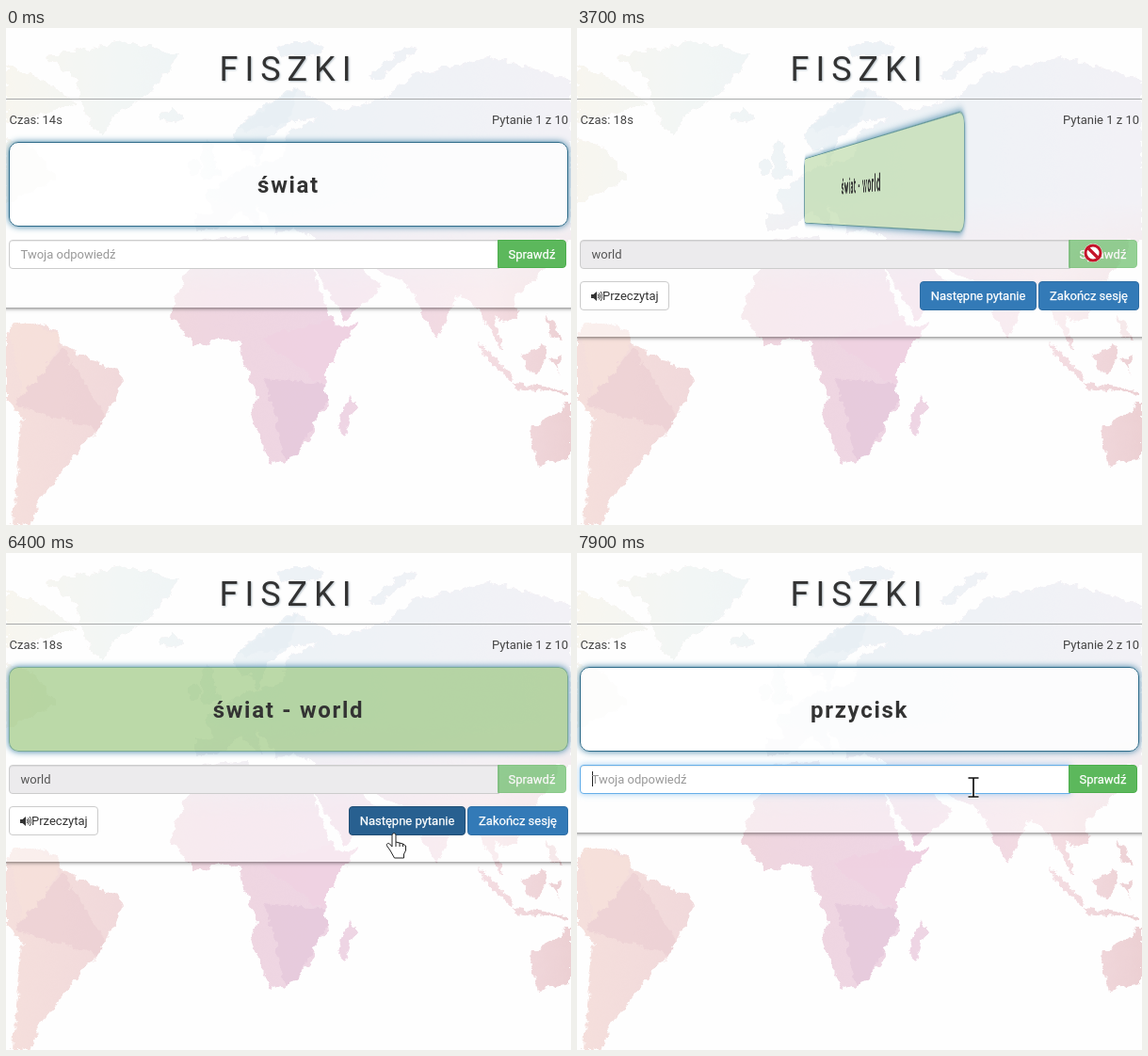
An HTML page for the animation above (8000 ms loop, 600 by 528 pixels).

```html
<!DOCTYPE html>
<html lang="pl">
<head>
<meta charset="utf-8">
<title>Fiszki</title>
<style>
html, body { margin: 0; width: 100%; height: 100%; overflow: hidden; background: #fefefe; }
* { box-sizing: border-box; }
#stage { position: absolute; left: 0; top: 0; width: 600px; height: 528px; overflow: hidden; font: 13px/16px Roboto, sans-serif; color: #444; }
#stage > *, #scene > * { position: absolute; }
#map, #pointer { left: 0; top: 0; width: 600px; height: 528px; }
#panel { left: -5px; top: -5px; width: 610px; background: rgba(255,255,255,.5); box-shadow: 0 1px 4px rgba(0,0,0,.55); }
h1 { left: 0; top: 22px; width: 600px; margin: 0; text-align: center; font: 400 36px/44px Roboto, sans-serif; letter-spacing: 7px; color: #333; text-shadow: 1px 1px 2px rgba(60,90,110,.35); }
#rule { left: 0; top: 75px; width: 600px; height: 1px; background: #a9abac; }
#clock { left: 3.5px; top: 90px; }
#count { right: 3px; top: 90px; }
#scene { left: 0; top: 0; width: 600px; height: 528px; perspective: 920px; perspective-origin: 300px 196px; }
#card { left: 3px; top: 121px; width: 594px; height: 90px; border: 1px solid; border-radius: 10px; box-shadow: 0 0 7px #3b80a4; text-align: center; font: 700 24px/90px Roboto, sans-serif; letter-spacing: 1.7px; color: #333; }
#field { left: 3px; top: 225px; width: 521px; height: 31px; padding: 0 11.5px; line-height: 29px; border: 1px solid #ccc; border-radius: 4px 0 0 4px; background: #fff; color: #555; box-shadow: inset 0 1px 1px rgba(0,0,0,.075); white-space: nowrap; }
#field.focus { border-color: #66afe9; box-shadow: inset 0 1px 1px rgba(0,0,0,.075), 0 0 7px rgba(102,175,233,.6); }
#field.off { background: #ecebed; }
#hint { color: #999; }
#caret { display: inline-block; width: 1px; height: 16px; margin-right: -1px; vertical-align: -3px; background: #222; }
.btn { top: 269px; height: 31px; line-height: 29px; text-align: center; border: 1px solid #2e6da4; border-radius: 4px; background: #337ab7; color: #fff; white-space: nowrap; -webkit-text-stroke: .25px; }
.btn.hover { background: #286090; border-color: #204d74; }
#check { left: 522px; top: 225px; width: 73px; height: 30px; border-color: #4cae4c; border-radius: 0 4px 4px 0; background: #5cb85c; }
#check.hover { background: #449d44; border-color: #398439; }
#check.off { opacity: .65; }
#read { left: 3px; width: 95px; padding-left: 11px; text-align: left; background: #fff; border-color: #ccc; color: #333; -webkit-text-stroke: 0; }
#read svg { width: 12px; height: 12px; vertical-align: -2px; }
#next { left: 364px; width: 124px; }
#end { left: 490px; width: 107px; }
</style>
</head>
<body>
<div id="stage">
  <svg id="map" viewBox="0 0 600 528">
    <defs>
      <filter id="coast" x="0" y="0" width="600" height="528" filterUnits="userSpaceOnUse" color-interpolation-filters="sRGB">
        <feTurbulence type="fractalNoise" baseFrequency=".1" numOctaves="4" seed="4"/>
        <feDisplacementMap in="SourceGraphic" scale="11" xChannelSelector="R" yChannelSelector="G"/>
      </filter>
      <linearGradient id="north">
        <stop offset="0" stop-color="#f1ede0"/><stop offset=".2" stop-color="#e6eeec"/>
        <stop offset=".45" stop-color="#dae6ee"/><stop offset="1" stop-color="#e6e4ee"/>
      </linearGradient>
      <linearGradient id="south">
        <stop offset="0" stop-color="#f5dfdc"/><stop offset=".2" stop-color="#f1d9db"/>
        <stop offset=".35" stop-color="#efd6e0"/><stop offset=".6" stop-color="#eed5e4"/>
        <stop offset=".85" stop-color="#f4dde2"/><stop offset="1" stop-color="#ecd0d3"/>
      </linearGradient>
      <linearGradient id="fade" x2="0" y2="1">
        <stop offset=".34" stop-color="#fff"/><stop offset=".53" stop-color="#000"/>
      </linearGradient>
      <mask id="upper"><rect width="600" height="528" fill="url(#fade)"/></mask>
      <clipPath id="land">
        <polygon class="south-america" points="0 333 5 318 22 312 47 318 60 335 82 349 117 364 125 373 110 405 98 426 82 442 64 465 38 497 27 526 8 530 10 490 18 415 -9 385"/>
        <polygon class="africa" points="209 226 256 221 283 247 323 247 337 288 352 318 374 312 345 355 338 372 343 402 328 416 327 430 308 455 281 465 261 410 267 392 251 350 248 333 225 331 200 338 176 306 180 285"/>
        <polygon class="madagascar" points="368 391 371 402 360 434 351 424 355 408"/>
        <polygon class="australia" points="609 398 592 398 587 408 558 424 555 433 565 464 609 455"/>
        <polygon class="sumatra" points="501 332 541 373 537 376 511 351"/>
        <polygon class="java" points="540 377 597 384 597 388 540 383"/>
        <polygon class="borneo" points="547 350 570 335 575 350 562 368"/>
        <polygon class="sulawesi" points="578 352 591 348 583 357 589 369"/>
        <polygon class="philippines" points="574 302 584 320 592 332 580 330"/>
        <polygon class="scandinavia" points="259 128 245 129 242 112 262 92 303 63 347 85 356 92 300 100 277 117 268 145"/>
        <polygon class="europe" points="201 214 201 198 221 196 212 178 250 150 294 138 300 110 350 88 403 75 432 50 520 30 558 44 609 56 609 225 330 226 306 211 290 218 265 188 274 218 250 194 227 214"/>
        <polygon class="asia" points="330 220 609 200 582 206 584 240 549 280 538 284 545 307 526 312 519 306 528 344 513 320 502 298 482 282 462 320 457 331 444 304 424 270 373 249 400 275 358 312 330 256"/>
        <polygon class="britain" points="214 116 228 155 210 162 206 138"/>
        <polygon class="greenland" points="45 30 130 14 185 28 150 72 118 90 102 115 85 95 75 55"/>
        <polygon class="baffin" points="-9 38 40 55 75 80 25 95 -9 102"/>
        <polygon class="labrador" points="-9 115 30 128 55 160 40 168 -9 190"/>
        <polygon class="novaya" points="384 52 425 20 438 22 396 54"/>
        <ellipse class="svalbard" cx="312" cy="23" rx="26" ry="7"/>
        <ellipse class="iceland" cx="176" cy="94" rx="13" ry="6"/>
        <ellipse class="ireland" cx="200" cy="147" rx="4" ry="8"/>
      </clipPath>
    </defs>
    <g filter="url(#coast)"><g clip-path="url(#land)">
      <rect width="600" height="528" fill="url(#south)"/>
      <rect width="600" height="528" fill="url(#north)" mask="url(#upper)"/>
      <g opacity=".7">
        <path fill="#f7e2da" d="M0 300 60 330 20 400Z"/>
        <path fill="#eccfd3" d="M10 400 120 435 60 340Z"/>
        <path fill="#e4c6da" d="M275 372 350 380 300 470Z"/>
        <path fill="#f0d0e2" d="M270 330 380 300 335 378Z"/>
        <path fill="#cfdfe8" d="M240 110 310 60 300 100Z"/>
      </g>
    </g></g>
  </svg>
  <div id="panel"></div>
  <h1>FISZKI</h1>
  <div id="rule"></div>
  <div id="clock"></div>
  <div id="count"></div>
  <div id="scene"><div id="card"></div></div>
  <div id="field"><span id="typed"></span><i id="caret"></i><span id="hint">Twoja odpowiedź</span></div>
  <div id="check" class="btn">Sprawdź</div>
  <div id="read" class="btn answer"><svg viewBox="0 0 12 12"><path d="M0 4h2.5L6 1v10L2.5 8H0z" fill="#333"/><path d="M7.3 4q1.4 2 0 4M8.6 2.5q2.6 3.5 0 7M10 1q3.8 5 0 10" fill="none" stroke="#333"/></svg>Przeczytaj</div>
  <div id="next" class="btn answer">Następne pytanie</div>
  <div id="end" class="btn answer">Zakończ sesję</div>
  <svg id="pointer" viewBox="0 0 600 528">
    <g id="arrow"><path d="M0 0V18L4.2 14.2 7.2 21 10 19.8 7.2 13.2H13Z" fill="#fff" stroke="#222"/></g>
    <g id="text" fill="none">
      <path id="beam" d="M-5.5-10H5.5M0-10V10M-5.5 10H5.5" stroke="#fff" stroke-width="3.4"/>
      <path d="M-5.5-10H5.5M0-10V10M-5.5 10H5.5" stroke="#111" stroke-width="1.7"/>
    </g>
    <g id="hand"><path d="M-2 2C-2-1 2-1 2 2V9L6 10 9.5 11 12.5 13V18L10.5 22V26H.5L-4 18-7.5 13C-8.5 11-6 9.5-4.5 11L-2 14Z" fill="#fff" stroke="#222" stroke-linejoin="round"/><path d="M2 9v5M6 10v4M9.5 11v3" stroke="#222"/></g>
    <g id="denied"><circle r="10" fill="#fff" opacity=".8"/><circle r="8" fill="#fff" stroke="#c4142a" stroke-width="3"/><path d="M-5.5-5.5 5.5 5.5" stroke="#c4142a" stroke-width="3.2"/></g>
  </svg>
</div>
<script>
const $ = id => document.getElementById(id);
const LOOP = 8000, STEP = 100;
const SUBMIT = 3430, NEXT = 6800;

// time, x, y, shape
const path = [
  [600, 578, 348, 'arrow'], [1000, 515, 252, 'text'], [1100, 501, 243, 'text'],
  [1700, 501, 243, 'text'], [1900, 534, 242, 'hand'], [2000, 549, 240, 'hand'],
  [3500, 548, 239, 'denied'], [5600, 548, 239, 'denied'], [5700, 543, 239, 'denied'],
  [5900, 506, 277, 'hand'], [6000, 480, 293, 'hand'], [6100, 480, 293, 'hand'],
  [6400, 412, 298, 'hand'], [6900, 412, 298, 'arrow'], [7400, 412, 298, 'arrow'],
  [7800, 420, 253, 'text'], [7900, 421, 249, 'text']
];
const seconds = [[0, 14], [300, 15], [1300, 16], [2200, 17], [3200, 18], [NEXT, 0], [7800, 1]];
const typing = [[0, ''], [2300, 'w'], [2500, 'wo'], [2600, 'wor'], [2800, 'worl'], [3000, 'world'], [NEXT, '']];
const carets = [[0, false], [1200, true], [1800, false], [2300, true], [SUBMIT, false], [7500, true]];

const at = (table, t) => table.filter(row => row[0] <= t).pop();
const between = (t, from, to) => t >= from && t < to;
const mix = (a, b, k) => a + (b - a) * k;
const rgba = (a, b, k) => `rgba(${a.map((v, i) => mix(v, b[i], k)).join()})`;
const show = (el, on) => el.style.display = on ? '' : 'none';

// cubic-bezier(.25, .1, .25, 1)
function ease(p) {
  if (p <= 0) return 0;
  if (p >= 1) return 1;
  const curve = (u, a, b) => 3 * a * u * (1 - u) ** 2 + 3 * b * u * u * (1 - u) + u ** 3;
  let lo = 0, hi = 1;
  for (let i = 0; i < 24; i++) {
    const u = (lo + hi) / 2;
    if (curve(u, .25, .25) < p) lo = u; else hi = u;
  }
  return curve(lo, .1, 1);
}

function drawCard(t) {
  const turn = ease((t - SUBMIT) / 800) - ease((t - 7000) / 650);
  const back = turn > .5;
  const card = $('card');
  card.style.transform = turn > 0 && turn < 1 ? `rotateY(${turn * 180 - (back ? 180 : 0)}deg)` : 'none';
  card.style.backgroundColor = rgba([255, 255, 255, .8], [142, 192, 110, .6], turn);
  card.style.borderColor = rgba([47, 108, 138, 1], [80, 140, 140, .6], turn);
  card.textContent = t < NEXT ? (back ? 'świat - world' : 'świat') : back ? '' : 'przycisk';
}

function drawPointer(t) {
  const row = at(path, t);
  for (const shape of ['arrow', 'text', 'hand', 'denied']) show($(shape), row && row[3] === shape);
  if (!row) return;
  const next = path[path.indexOf(row) + 1] || row;
  const k = next === row ? 0 : (t - row[0]) / (next[0] - row[0]);
  $(row[3]).setAttribute('transform', `translate(${mix(row[1], next[1], k)} ${mix(row[2], next[2], k)})`);
}

function draw(t) {
  const answered = between(t, SUBMIT, NEXT);
  const typed = at(typing, t)[1];
  $('clock').textContent = `Czas: ${at(seconds, t)[1]}s`;
  $('count').textContent = `Pytanie ${t < NEXT ? 1 : 2} z 10`;
  $('panel').style.height = (answered ? 333 : 302) + 'px';
  document.querySelectorAll('.answer').forEach(el => show(el, answered));
  $('typed').textContent = typed;
  show($('hint'), !typed);
  show($('caret'), at(carets, t)[1]);
  $('field').className = answered ? 'off' : between(t, 1300, SUBMIT) || t >= 7500 ? 'focus' : '';
  $('check').classList.toggle('off', answered);
  $('check').classList.toggle('hover', between(t, 1900, SUBMIT));
  $('end').classList.toggle('hover', between(t, 5900, 6000));
  $('next').classList.toggle('hover', between(t, 6000, NEXT));
  drawCard(t);
  drawPointer(t);
}

const start = performance.now();
let shown = -1;
function tick() {
  const t = Math.floor((performance.now() - start) % LOOP / STEP) * STEP;
  if (t !== shown) draw(shown = t);
  requestAnimationFrame(tick);
}
tick();
</script>
</body>
</html>
```
